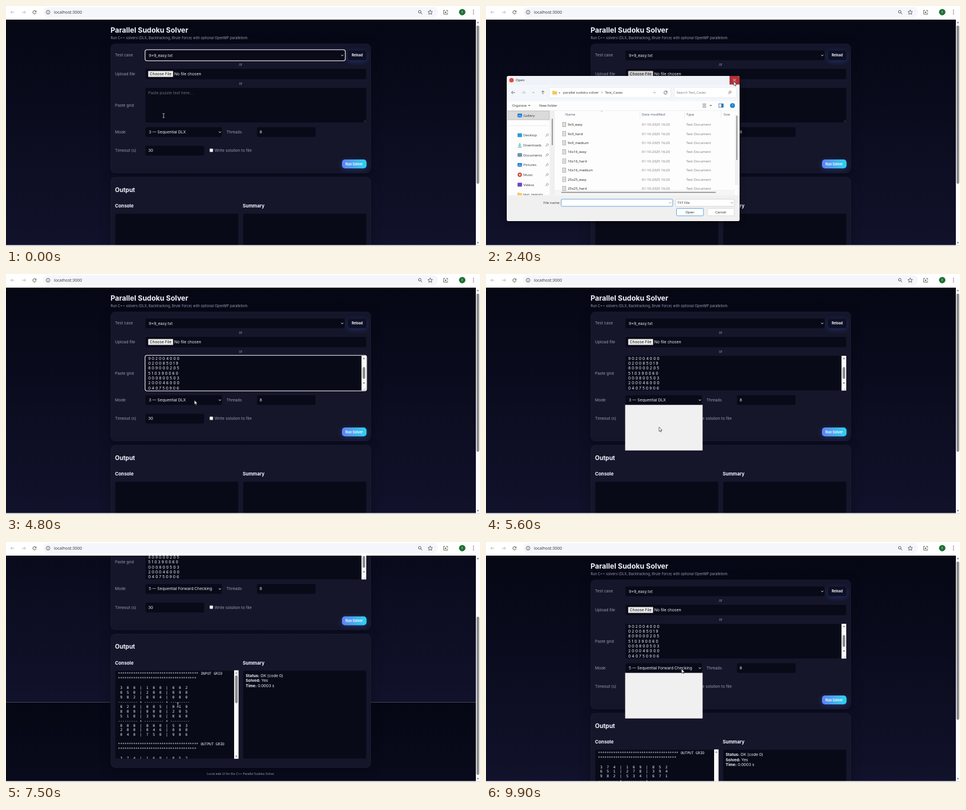
An HTML page that plays this animation: 800 px wide and 405 px high, repeating every 10 s.

```html
<!DOCTYPE html>
<html lang="en">
<head>
<meta charset="utf-8">
<title>Parallel Sudoku Solver</title>
<style>
html, body { margin: 0; width: 100%; height: 100%; overflow: hidden; background: #fff; }
svg { display: block; }
text { font-family: Inter, sans-serif; white-space: pre; }
.ui text, text.ui { font-family: "Open Sans", "Noto Sans", sans-serif; }
text.mono { font-family: "DejaVu Sans Mono", monospace; }
.card { filter: drop-shadow(0 4px 9px rgba(0,0,0,.3)); }
.glow { filter: drop-shadow(0 2px 4px rgba(70,110,255,.3)); }
#dialog { filter: drop-shadow(0 3px 5px rgba(0,0,0,.5)); }
</style>
</head>
<body>
<svg id="stage" width="800" height="405" viewBox="0 0 800 405"></svg>
<script>
const rect = (x, y, w, h, fill, more = '') =>
  `<rect x="${x}" y="${y}" width="${w}" height="${h}" fill="${fill}" ${more}/>`;
const text = (x, y, s, size = 6.67, fill = '#eef0fa', more = '') =>
  `<text x="${x}" y="${y}" font-size="${size}" fill="${fill}" ${more}>${s}</text>`;
const line = (d, stroke = '#444', width = .8, more = '') =>
  `<path d="${d}" fill="none" stroke="${stroke}" stroke-width="${width}" ${more}/>`;
const dot = (x, y, r, fill, more = '') => `<circle cx="${x}" cy="${y}" r="${r}" fill="${fill}" ${more}/>`;
const group = (id, body, more = '') => `<g id="${id}" ${more}>${body}</g>`;
const box = (x, y, w, h) => rect(x, y, w, h, '#080a18', 'rx="3" stroke="#1b1d33" stroke-width=".6"');
const ring = (id, x, y, w, h) => group(id, rect(x, y, w, h, 'none', 'rx="3.5" stroke="#f4f4f4" stroke-width="1.1"'));
const chevron = (x, y, c = '#fff', w = 1) => line(`M${x - 1.8} ${y - .9}l1.8 1.8l1.8 -1.8`, c, w);
const tri = (x, y, s, c = '#777') => `<path d="M${x - 2} ${y + s}h4l-2 ${-2.4 * s}z" fill="${c}"/>`;
const lens = (x, y, c = '#444') => dot(x, y, 2.2, 'none', `stroke="${c}" stroke-width=".9"`) + line(`M${x + 1.6} ${y + 1.6}l2.4 2.4`, c, 1);
const reload = (x, y, r, c = '#444') =>
  line(`M${x + r * .8} ${y - r * .6}A${r} ${r} 0 1 0 ${x + r} ${y + r * .3}M${x + r} ${y - r}v${r * .8}h${-r * .8}`, c, .9);
const arrow = (x, y, d, c) => line(`M${x - 3} ${y}h6M${x + d * .5} ${y - 2.6}l${d * 2.6} 2.6l${-d * 2.6} 2.6`, c, .9);
const dim = '#989caf', bold = 'font-weight="700"', mid = 'text-anchor="middle"';

// Puzzle data
const solution = ['374169852', '651278394', '982534671', '423685719', '869417235',
  '517392468', '796821543', '235946187', '148753926'];
const puzzle = ['300100002', '050200090', '902004000', '020085019', '809000205',
  '510390060', '000800503', '200046000', '040750906'];
const star = n => '*'.repeat(n);
const gridLines = rows => rows.flatMap((r, i) => {
  const cells = r.match(/.../g).map(p => ' ' + [...p].join('  ')).join('  | ');
  return i && i % 3 == 0 ? [Array(3).fill('-'.repeat(9)).join(' + '), cells] : [cells];
});
const section = (name, rows) => [star(37) + ` ${name} GRID`, star(36), '', ...gridLines(rows), ''];
const log = [...section('INPUT', puzzle), ...section('OUTPUT', solution),
  star(51), star(35), '[Solved in 0.000304 seconds.]'];
const pitch = 7.94, logScroll = 15 * pitch;

function page() {
  const pasted = puzzle.slice(2).map((r, i) => text(240, 144.7 + i * 8.33, [...r].join(' '))).join('');
  const output = log.map((s, i) => text(5, 7.7 + i * pitch, s, 6.1, '#f0f2fa', 'class="mono"')).join('');
  const fact = (y, k, v) => text(404.5, y, `<tspan ${bold}>${k}:</tspan> ${v}`);
  const card = (y, h) => rect(177, y, 438.5, h, '#15162a', 'rx="7" stroke="#1f2138" stroke-width=".7" class="card"');
  return rect(0, 23, 793, 381, 'url(#night)') + rect(0, 404, 793, 381, 'url(#night)') +
    text(176.5, 44.7, 'Parallel Sudoku Solver', 12, '#f2f4fc', bold) +
    text(176.5, 55.6, 'Run C++ solvers (DLX, Backtracking, Brute Force) with optional OpenMP parallelism.', 5.83, dim) +
    card(64, 217.5) + card(289, 225) +
    [['Test case', 83], ['Upload file', 115], ['Paste grid', 167.5], ['Mode', 212.5], ['Timeout (s)', 244]]
      .map(([s, y]) => text(184, y + 2.4, s, 6.67, dim)).join('') +
    box(235, 74.5, 337, 17.5) + text(241, 85.5, '9×9_easy.txt') + chevron(567.5, 83.3) +
    rect(577, 75, 31.5, 16.5, '#0e1024', 'rx="4.5" class="glow"') + text(592.7, 85.2, 'Reload', 5.56, '#f4f6ff', bold + mid) +
    text(396, 100.8, 'or', 5.83, dim, mid) + text(396, 132.8, 'or', 5.83, dim, mid) +
    box(235, 105.5, 373.5, 18.5) +
    rect(240, 109.7, 42, 10, '#efefef', 'id="choose" stroke="#777" stroke-width=".5" rx=".8"') +
    text(261, 117.2, 'Choose File', 6.55, '#111', mid) + text(284, 117.2, 'No file chosen') +
    box(235, 137.5, 373.5, 59.5) +
    group('hint', text(240, 148.6, 'Paste puzzle text here...', 6.67, '#6c6f7d')) +
    group('pasted', pasted + rect(600, 138, 8, 58.7, '#fafafa') + tri(604, 142.5, 1) + tri(604, 184, -1) +
      rect(601.8, 157, 4.4, 20, '#8b8b8b', 'rx="2.2"')) +
    line('M604 195.7l3 -3M606 195.7l1 -1', '#888', .6) +
    ring('ringArea', 234.7, 137.2, 374, 60) + ring('ringCase', 234.7, 73.8, 338, 18.7) +
    box(235, 204, 130, 17.5) + group('mode3', text(241, 214.9, '3 — Sequential DLX')) +
    group('mode5', text(241, 214.9, '5 — Sequential Forward Checking')) + chevron(361, 212.8) +
    ring('ringMode', 234.7, 203.6, 130.8, 18.2) +
    text(372, 214.9, 'Threads', 6.67, dim) + box(423, 204, 100, 17.5) + text(428, 214.9, '8') +
    box(235, 235.3, 100, 17.5) + text(240, 246.4, '30') +
    rect(343.8, 240.8, 5.5, 5.5, '#fff', 'rx=".8" stroke="#777" stroke-width=".5"') +
    text(352, 246.4, 'Write solution to file', 6.67, dim) +
    rect(567, 259, 41.5, 15, 'url(#sky)', 'rx="5" class="glow"') +
    text(587.7, 268.5, 'Run Solver', 5.56, '#f4f9ff', bold + mid) +
    text(184, 313.8, 'Output', 10, '#f2f4fc', bold) +
    text(184, 340, 'Console', 7.8, '#f2f4fc', bold) + text(399.5, 340, 'Summary', 7.8, '#f2f4fc', bold) +
    box(184, 350, 208.5, 149.5) + box(400, 350, 208.5, 149.5) +
    group('result', `<svg x="184" y="350" width="201" height="149">${group('log', output)}</svg>` +
      rect(385, 350, 7.5, 149.3, '#fafafa') + tri(388.8, 354.6, 1) + tri(388.8, 495.2, -1) +
      rect(386.6, 442.5, 4.4, 47, '#8b8b8b', 'rx="2.2" id="logThumb"') +
      fact(361.4, 'Status', 'OK (code 0)') + fact(369.8, 'Solved', 'Yes') + fact(378.1, 'Time', '0.0003 s')) +
    text(396, 526.5, 'Local web UI for the C++ Parallel Sudoku Solver', 5, dim, mid) +
    group('popup', rect(235, 221, 130.3, 76.7, '#f0f0f1', 'stroke="#c4c4c8" stroke-width=".5"'));
}

function browser() {
  return rect(0, 0, 800, 23, '#fff') + arrow(11, 10.5, -1, '#b5b7bb') + arrow(30, 10.5, 1, '#b5b7bb') + reload(48, 10.5, 2.8) +
    rect(63, 2, 666, 17, '#f4f6fb', 'rx="8.5"') + dot(71, 10.5, 3.2, 'none', 'stroke="#444" stroke-width=".8"') +
    line('M71 10v2.2M71 8.4v.8') + text(81, 13, 'localhost:3000', 7, '#333', 'class="ui"') + lens(698.3, 9.7) +
    line('M716 6.6l1.1 2.6 2.8.2-2.1 1.9.6 2.8-2.4-1.5-2.4 1.5.6-2.8-2.1-1.9 2.8-.2z') +
    line('M741 7.4h-2.3v6.4h6.6v-2.4M743 7.4h2.3v2.4') + dot(742, 10.6, 1.2, '#444') +
    dot(770, 10.3, 5.4, '#19702f') + text(770, 12.2, 'E', 5.2, '#d8ecd8', 'class="ui" ' + mid) +
    [7.3, 10.3, 13.3].map(y => dot(789, y, .8, '#444')).join('') +
    rect(793, 23, 7, 382, '#fcfcfc') + tri(796.4, 28, 1) + tri(796.4, 399.5, -1) +
    rect(794.2, 33, 4.4, 267, '#8b8b8b', 'rx="2.2" id="thumb"') + rect(0, 403.4, 800, 1.6, '#e4e8ef');
}

function dialog() {
  const t = (x, y, s, c = '#333', more = '') => text(x, y + 2.1, s, 5.9, c, more);
  const field = (x, y, w, h, c) => rect(x, y, w, h, '#fff', `rx="1.2" stroke="${c}" stroke-width=".7"`);
  const shell = rect(35, 118, 393, 245, '#fdfdfd', 'rx="3.5"') +
    `<path d="M35 133v-11.5q0-3.5 3.5-3.5h386q3.5 0 3.5 3.5v11.5z" fill="#eff3f9"/>` +
    dot(43, 125.2, 3.8, '#df4b3b') + t(50, 125.2, 'Open', '#222') +
    line('M417 122.8l4.8 4.8m0-4.8l-4.8 4.8', '#333', .7) +
    rect(107.5, 177, 8.5, 142, '#f0f0f0') + rect(420, 184, 7.5, 118, '#f0f0f0') + rect(116, 310, 304, 9, '#f5f5f5') +
    rect(111, 190, 1.6, 45, '#858585', 'rx=".8"') + rect(422.6, 185, 1.6, 75, '#858585', 'rx=".8"') +
    rect(127, 313.7, 261, 1.6, '#858585', 'rx=".8"') +
    `<path d="M35 319.3h393v40.2q0 3.5-3.5 3.5h-386q-3.5 0-3.5-3.5z" fill="#f0f0f0"/>` +
    rect(127, 326, 188, 12, '#fff') + rect(320, 326, 99, 12, '#fff') + rect(321, 341.5, 46, 12.5, '#fdfdfd') + rect(373, 341.5, 46, 12.5, '#fdfdfd');

  const folder = (x, y) => `<path d="M${x - 4} ${y - 3}h3l1 1h4v5.5h-8z" fill="#f5c75a"/>`;
  const places = [['Desktop', '#2a9fd8'], ['Downloads', '#12a5a0'], ['Documents', '#6f8fb0'],
    ['Pictures', '#1f7fd6'], ['Music', '#d2543f'], ['Videos', '#6a48c0']];
  const icon = (i, y, c) => i == 1 ? line(`M57 ${y - 3.5}v5m-2.2-2l2.2 2.2 2.2-2.2M53.5 ${y + 3.4}h7`, c, 1) :
    i == 4 ? dot(57, y, 3.7, c) + dot(57, y, 1.2, '#fff') : rect(53.2, y - 3.2, 7.6, 6.4, c, 'rx="1"') +
    (i == 3 ? line(`M54 ${y + 2.5}l3-3 3 3`, '#fff') : '');
  const nav = rect(36.5, 177, 70.5, 15, '#dadada', 'stroke="#999" stroke-width=".5"') + icon(3, 184.8, '#1f7fd6') +
    t(63, 184.8, 'Gallery') + line('M40 202h64', '#ddd', .6) +
    places.map(([s, c], i) => {
      const y = 218 + i * 16.7;
      return icon(i, y, c) + t(63, y, s) + line(`M100.5 ${y + 2.5}l2-2m-1-1.6l2.7 2.7m-1.8-3.3l1.2-1 2 2-1 1.2`, '#777', .8);
    }).join('') + `<svg x="36" y="310" width="71" height="9.3">${folder(21, 8)}${t(27, 8, 'test_reports')}</svg>`;
  const files = ['9x9', '16x16', '25x25'].flatMap(n => ['easy', 'hard', 'medium'].map(l => n + '_' + l)).slice(0, 8);
  const list = [134, 263, 338, 401].map((x, i) => t(x, 183.3, ['Name', 'Date modified', 'Type', 'Size'][i], '#4b5a70')).join('') +
    [260, 335, 397].map(x => line(`M${x} 177v12`, '#e2e2e2', .6)).join('') + line('M193.5 178.6l1.8-1.5 1.8 1.5', '#888', .5) +
    `<svg x="0" y="0" width="420" height="312">` + files.map((s, i) => {
      const y = 200 + i * 15.42;
      return rect(129.5, y - 3.7, 5.2, 7.4, '#fff', 'stroke="#777" stroke-width=".6"') +
        line(`M130.7 ${y - 1.7}h2.8m-2.8 1.7h2.8m-2.8 1.7h2.8`, '#888', .6) +
        t(138, y, s, '#222') + t(263, y, '01-10-2025 16:20', '#777') + t(338, y, 'Text Document', '#777');
    }).join('') + '</svg>';
  const details = rect(35, 133, 393, 27.5, '#f3f6fb') + arrow(46, 146, -1, '#666') + arrow(63, 146, 1, '#bbb') + chevron(80, 146, '#777', .7) +
    line('M96 149v-6m-2.6 2.6l2.6-2.6 2.6 2.6', '#555') + field(107, 137.3, 205, 17.5, '#e1e4ea') + folder(116, 146) +
    t(122.5, 145.6, '«') + t(130, 146, 'parallel sudoku solver') + line('M195 144.3l1.5 1.6-1.5 1.6', '#555', .6) +
    t(201, 146, 'Test_Cases') + chevron(284.5, 146, '#555', .7) + reload(303, 146, 2.7, '#555') +
    field(317.5, 137.3, 105, 17.5, '#e1e4ea') + t(321.5, 146, 'Search Test_Cases', '#777') +
    dot(412, 145.3, 1.8, 'none', 'stroke="#555" stroke-width=".7"') + line('M410.7 146.6l-1.8 1.8', '#555') +
    t(44, 168, 'Organize') + tri(73, 168, -.7, '#444') + t(90, 168, 'New folder') +
    line('M365.5 165.5h6m-6 2.5h6m-6 2.5h6', '#555') + tri(379.3, 168, -.7, '#444') +
    rect(393, 165, 7.5, 6, '#fff', 'stroke="#24558c" stroke-width=".7"') + rect(397.2, 165, 3.3, 6, '#2478bd') +
    dot(416, 168, 4.1, '#1580d0') + t(416, 168, '?', '#fff', mid) + line('M35 176.5h393', '#e5e5e5', .5) +
    nav + list + t(97, 332, 'File name:') + field(127, 326, 188, 12, '#2a86d0') + chevron(310.5, 332, '#555', .6) +
    field(320, 326, 99, 12, '#c8c8c8') + t(323, 332, 'TXT File') + chevron(415, 332, '#555', .6) +
    field(321.5, 341.5, 45.5, 12.5, '#2a86d0') + t(344, 347.8, 'Open', '#222', mid) +
    field(373.5, 341.5, 45.5, 12.5, '#cfcfcf') + t(396, 347.8, 'Cancel', '#222', mid);
  const hot = `<path d="M411 118h13.5q3.5 0 3.5 3.5v11h-17z" fill="#b52f38"/>` + line('M417 122.8l4.8 4.8m0-4.8l-4.8 4.8', '#fff', .7);
  return shell + group('blankLabel', rect(97, 327, 28, 9, '#fdfdfd')) + group('details', details) + group('closeHot', hot);
}

const stage = document.getElementById('stage');
stage.innerHTML = `<defs>
  <linearGradient id="night" x2="0" y2="1"><stop stop-color="#050714"/><stop offset="1" stop-color="#11122b"/></linearGradient>
  <linearGradient id="sky"><stop stop-color="#5f82f3"/><stop offset="1" stop-color="#2bd3ec"/></linearGradient>
  <clipPath id="view">${rect(0, 23, 793, 381, '#000')}</clipPath></defs>
  <g clip-path="url(#view)">${group('page', page())}</g>${browser()}${group('dialog', dialog(), 'class="ui"')}` +
  group('pointer', `<path d="M0 0v7.2l1.7-1.5 1.1 2.5 1.2-.5-1.1-2.5h2.3z" fill="#fff" stroke="#111" stroke-width=".6"/>`) +
  group('beam', line('M-1.6-3.6q1.6 0 1.6.8q0-.8 1.6-.8M0-3v6M-1.6 3.6q1.6 0 1.6-.8q0 .8 1.6.8', '#ddd', .8));

const el = id => document.getElementById(id);
const show = (id, on) => el(id).style.display = on ? '' : 'none';
const move = (id, x, y) => el(id).setAttribute('transform', `translate(${x} ${y})`);
const ease = (t, a, b) => { const k = Math.min(1, Math.max(0, (t - a) / (b - a))); return k * k * (3 - 2 * k); };

// Pointer stops: time, x, y
const stops = [[0, 266, 185], [300, 266, 185], [1000, 262, 115], [1500, 262, 115], [2200, 418, 127], [2500, 418, 127],
  [3200, 300, 165], [4000, 300, 165], [4700, 318, 213], [5100, 318, 213], [5700, 290, 262], [5900, 290, 262],
  [6500, 568, 278], [6700, 585, 268], [7000, 585, 268], [7500, 290, 275], [8700, 290, 275], [9600, 330, 214], [10000, 330, 214]];

function draw(t) {
  const within = (a, b) => t >= a && t < b;
  const scroll = 133.5 * (ease(t, 7000, 7500) - ease(t, 8900, 9400));
  const read = ease(t, 7600, 8100);
  move('page', 0, -scroll);
  move('thumb', 0, scroll * 93 / 133.5);
  move('log', 0, -logScroll * read);
  move('logThumb', 0, -84 * (1 - read));

  show('ringCase', t < 1100);
  show('ringArea', within(3300, 5100));
  show('ringMode', within(5900, 6700));
  show('hint', t < 3700);
  show('pasted', t >= 3700);
  show('mode3', t < 5900);
  show('mode5', t >= 5900);
  show('popup', within(5100, 5900) || t >= 9800);
  show('result', t >= 6900);
  el('choose').setAttribute('fill', within(1000, 2500) ? '#d6d6d6' : '#efefef');

  show('dialog', within(1200, 2500));
  show('details', t >= 1400);
  show('blankLabel', t < 1400);
  show('closeHot', t >= 2200);
  const s = t < 1400 ? .97 : 1;
  el('dialog').setAttribute('transform', `translate(231.5 240.5) scale(${s}) translate(-231.5 -240.5)`);

  const i = stops.findIndex(p => p[0] > t), a = stops[i - 1], b = stops[i], k = ease(t, a[0], b[0]);
  const x = a[1] + (b[1] - a[1]) * k, y = a[2] + (b[2] - a[2]) * k;
  const typing = scroll > 100 ? x > 184 && x < 385 && y > 216 && y < 366
    : !scroll && x > 235 && x < 600 && y > 138 && y < 197;
  show('beam', typing);
  show('pointer', !typing);
  move('beam', x, y);
  move('pointer', x, y);
}

const start = performance.now();
function tick() {
  draw(Math.floor((performance.now() - start) % 10000 / 100) * 100);
  requestAnimationFrame(tick);
}
tick();
</script>
</body>
</html>
```
